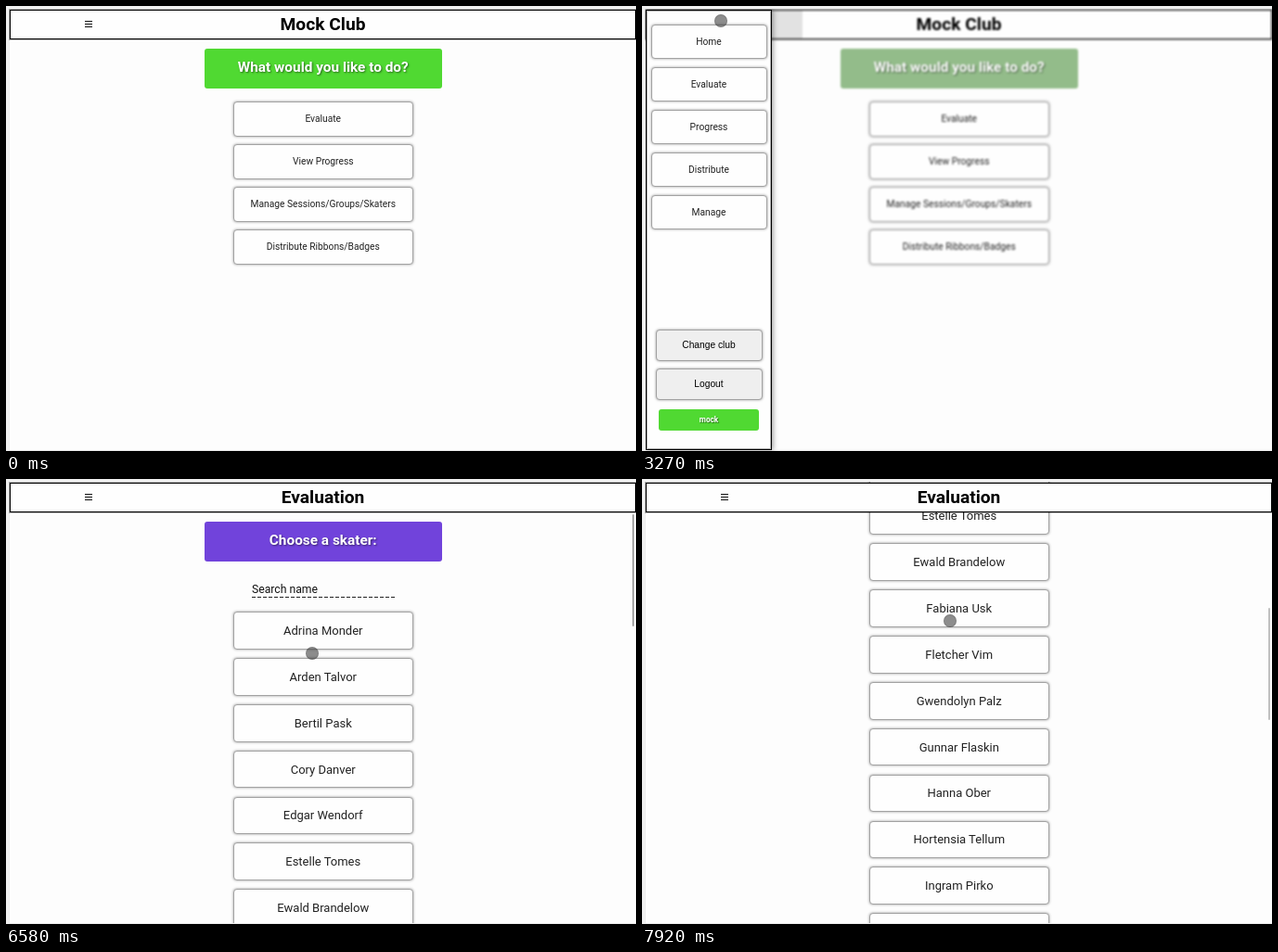
An HTML page that plays this animation: 679 px wide and 480 px high, repeating every 8 s.

```html
<!DOCTYPE html>
<html lang="en">
<head>
<meta charset="utf-8">
<title>Club evaluation</title>
<style>
@property --s { syntax: "<number>"; inherits: true; initial-value: 0; }

* { box-sizing: border-box; }
html, body { margin: 0; width: 100%; height: 100%; overflow: hidden; background: #f1f1f1; }
body { position: relative; font: 10.24px Roboto, sans-serif; color: #222; }
div { position: absolute; }

/* every animated part shares one 8 s clock and jumps between poses */
#page, #menu, #menu .hot, #cursor, .ham, .home, .eval, .pick, .later, #thumb {
  animation: 8s step-end infinite;
}

#view { inset: 0; clip-path: inset(3px 0 0 3px); }
#page { inset: 0; background: #fdfdfd; animation-name: dim; }
#page::after {
  content: ""; position: absolute; inset: 3px 0 0 3px;
  border: solid #ececec; border-width: 0 0 1px 1px;
}

/* header */
#head {
  left: 4px; top: 4px; width: 675px; height: 32px; z-index: 2;
  background: #fefefe; border: 1px solid #000; box-shadow: 0 0 0 1px rgba(0,0,0,.3);
}
#head .ham { left: 0; top: 0; width: 168px; height: 30px; animation-name: focus; }
.ham::before {
  content: ""; position: absolute; left: 80px; top: 11px; width: 7.5px; height: 1px;
  background: #111; box-shadow: 0 3px #111, 0 6px #111;
}
.title {
  left: 0; width: 673px; height: 30px; text-align: center;
  font-size: 19.2px; font-weight: 700; line-height: 29px; color: #000;
}

/* screens */
.screen { inset: 0; }
.home { animation-name: home; }
.eval { animation-name: eval; }
.pick { animation-name: pick; }
.later { animation-name: later; }
.banner {
  left: 214px; top: 46px; width: 255.5px; height: 42.5px; border-radius: 3px;
  font-size: 15.36px; font-weight: 700; line-height: 41px; text-align: center;
  color: #fff; text-shadow: 1px 1px 2px rgba(0,0,0,.5);
}
.green { background: #50d932; }
.purple { background: #7143db; }
.col { display: flex; flex-direction: column; }
.col div {
  position: relative; flex: none; display: flex; align-items: center; justify-content: center;
  background: #fefefe; border: 1px solid #a2a2a2; border-radius: 4px;
  box-shadow: 0 0 3px rgba(0,0,0,.4);
}
.opts { left: 245px; top: 103px; width: 193.5px; gap: 8.5px; }
.opts div { height: 37.5px; }

/* skater list */
#roll { inset: 0; transform: translateY(calc(var(--s) * -1px)); }
.search {
  left: 265px; top: 110px; width: 154px; height: 18px;
  font-size: 12.2px; line-height: 19px; color: #111;
}
.search::after {
  content: ""; position: absolute; left: 0; bottom: 0; width: 100%; height: 1px;
  background: repeating-linear-gradient(90deg, #222 0 4px, transparent 4px 6px);
}
.names { left: 245px; top: 143.2px; width: 193.5px; gap: 9.27px; font-size: 13px; }
.names div { height: 40.6px; }
#thumb {
  left: 675px; top: 38px; width: 2px; height: 121px; border-radius: 1px; background: #a6a6a6;
  transform: translateY(calc(var(--s) * .271px)); animation-name: fade;
}

/* side menu */
#menu {
  left: 4px; top: 4px; width: 136px; height: 475px; background: #fefefe;
  border: 1px solid #000;
  box-shadow: inset 0 0 0 1px rgba(0,0,0,.3), 2px 0 5px rgba(0,0,0,.3);
  animation-name: slide;
}
.links { left: 4.5px; top: 14.5px; width: 125px; gap: 8.5px; }
.links div { height: 37.5px; }
#menu .hot { animation-name: hot; }
.acts {
  left: 9.5px; top: 344px; width: 115px; gap: 8.5px;
  font-family: "Liberation Sans", Arial, sans-serif; color: #000;
}
.acts div { height: 33.5px; background: #efefef; }
.user {
  left: 13px; top: 429.5px; width: 108px; height: 23px; border-radius: 3px;
  font-size: 8.2px; font-weight: 700; line-height: 22px; text-align: center;
  color: #fff; text-shadow: 1px 1px 1px rgba(0,0,0,.5);
}

#cursor {
  left: -7px; top: -7px; width: 14px; height: 14px; border-radius: 50%;
  background: rgba(60,60,60,.58); border: 1px solid rgba(60,60,60,.2);
  animation-name: point;
}

@keyframes home { 0% { visibility: visible } 51.75%, 100% { visibility: hidden } }
@keyframes later { 0% { visibility: hidden } 51.75%, 100% { visibility: visible } }
@keyframes eval {
  0% { visibility: hidden }
  51.75% { visibility: visible }
  68.75%, 100% { visibility: hidden }
}
@keyframes pick {
  0% { visibility: hidden; --s: 0 }
  68.75% { visibility: visible; --s: 0 }
  83.5% { visibility: visible; --s: 42 }
  84.625% { visibility: visible; --s: 87 }
  85.875% { visibility: visible; --s: 130 }
  87.125% { visibility: visible; --s: 163.5 }
  88.25% { visibility: visible; --s: 187 }
  89.375% { visibility: visible; --s: 229 }
  90.625% { visibility: visible; --s: 280 }
  91.75% { visibility: visible; --s: 322 }
  93% { visibility: visible; --s: 354 }
  94.125%, 100% { visibility: visible; --s: 373 }
}
@keyframes fade {
  0% { background: #a6a6a6 }
  96.5% { background: #adadad }
  97.75% { background: #b6b6b6 }
  99%, 100% { background: #c0c0c0 }
}
@keyframes focus {
  0% { background: transparent }
  28.625% { background: #e2e2e2 }
  51.75%, 100% { background: transparent }
}
@keyframes dim {
  0% { filter: none }
  28.625% { filter: grayscale(.35) blur(.4px) }
  29.625% { filter: grayscale(.7) blur(.8px) }
  51.75%, 100% { filter: none }
}
@keyframes slide {
  0% { transform: translateX(-155px) }
  28.625% { transform: translateX(-65px) }
  29.625% { transform: none }
  51.75% { transform: translateX(-126.5px) }
  52.875%, 100% { transform: translateX(-155px) }
}
@keyframes hot {
  0% { background: #fefefe }
  51.75%, 100% { background: #b4d1e4 }
}
@keyframes point {
  0% { transform: translate(-40px, -40px) }
  11.5% { transform: translate(403px, 393px) }
  12.625% { transform: translate(260px, 285px) }
  13.75% { transform: translate(150px, 195px) }
  16.25% { transform: translate(142px, 172px) }
  17.5% { transform: translate(120px, 110px) }
  18.625% { transform: translate(100px, 55px) }
  19.875% { transform: translate(88px, 24px) }
  21.125% { transform: translate(84px, 15px) }
  40.875% { transform: translate(85px, 16px) }
  42% { transform: translate(88px, 27px) }
  43.25% { transform: translate(94px, 48px) }
  44.375% { transform: translate(101px, 71px) }
  45.5% { transform: translate(106px, 88px) }
  46.75% { transform: translate(108px, 94px) }
  55.375% { transform: translate(116px, 95px) }
  56.625% { transform: translate(165px, 104px) }
  57.75% { transform: translate(235px, 117px) }
  59% { transform: translate(290px, 127px) }
  60.125% { transform: translate(307px, 129px) }
  74.875% { transform: translate(307px, 131px) }
  78.625% { transform: translate(310px, 139px) }
  79.875% { transform: translate(318px, 160px) }
  81.125% { transform: translate(327px, 181px) }
  82.25% { transform: translate(330px, 188px) }
  85.875% { transform: translate(331px, 190px) }
  96.5% { transform: translate(331px, 183px) }
  97.75% { transform: translate(332px, 165px) }
  99%, 100% { transform: translate(332px, 153px) }
}
</style>
</head>
<body>
<div id="view">
  <div id="page">
    <div id="head">
      <div class="ham"></div>
      <div class="title home">Mock Club</div>
      <div class="title later">Evaluation</div>
    </div>

    <div class="screen home">
      <div class="banner green">What would you like to do?</div>
      <div class="col opts">
        <div>Evaluate</div>
        <div>View Progress</div>
        <div>Manage Sessions/Groups/Skaters</div>
        <div>Distribute Ribbons/Badges</div>
      </div>
    </div>

    <div class="screen eval">
      <div class="banner purple">What would you like to evaluate?</div>
      <div class="col opts">
        <div>Skater</div>
        <div>Club</div>
        <div>Group</div>
      </div>
    </div>

    <div class="screen pick">
      <div id="roll">
        <div class="banner purple">Choose a skater:</div>
        <div class="search">Search name</div>
        <div class="col names">
          <div>Adrina Monder</div>
          <div>Arden Talvor</div>
          <div>Bertil Pask</div>
          <div>Cory Danver</div>
          <div>Edgar Wendorf</div>
          <div>Estelle Tomes</div>
          <div>Ewald Brandelow</div>
          <div>Fabiana Usk</div>
          <div>Fletcher Vim</div>
          <div>Gwendolyn Palz</div>
          <div>Gunnar Flaskin</div>
          <div>Hanna Ober</div>
          <div>Hortensia Tellum</div>
          <div>Ingram Pirko</div>
          <div>Jorina Maspel</div>
        </div>
      </div>
      <div id="thumb"></div>
    </div>
  </div>

  <div id="menu">
    <div class="col links">
      <div>Home</div>
      <div class="hot">Evaluate</div>
      <div>Progress</div>
      <div>Distribute</div>
      <div>Manage</div>
    </div>
    <div class="col acts">
      <div>Change club</div>
      <div>Logout</div>
    </div>
    <div class="user green">mock</div>
  </div>
</div>
<div id="cursor"></div>
</body>
</html>
```
